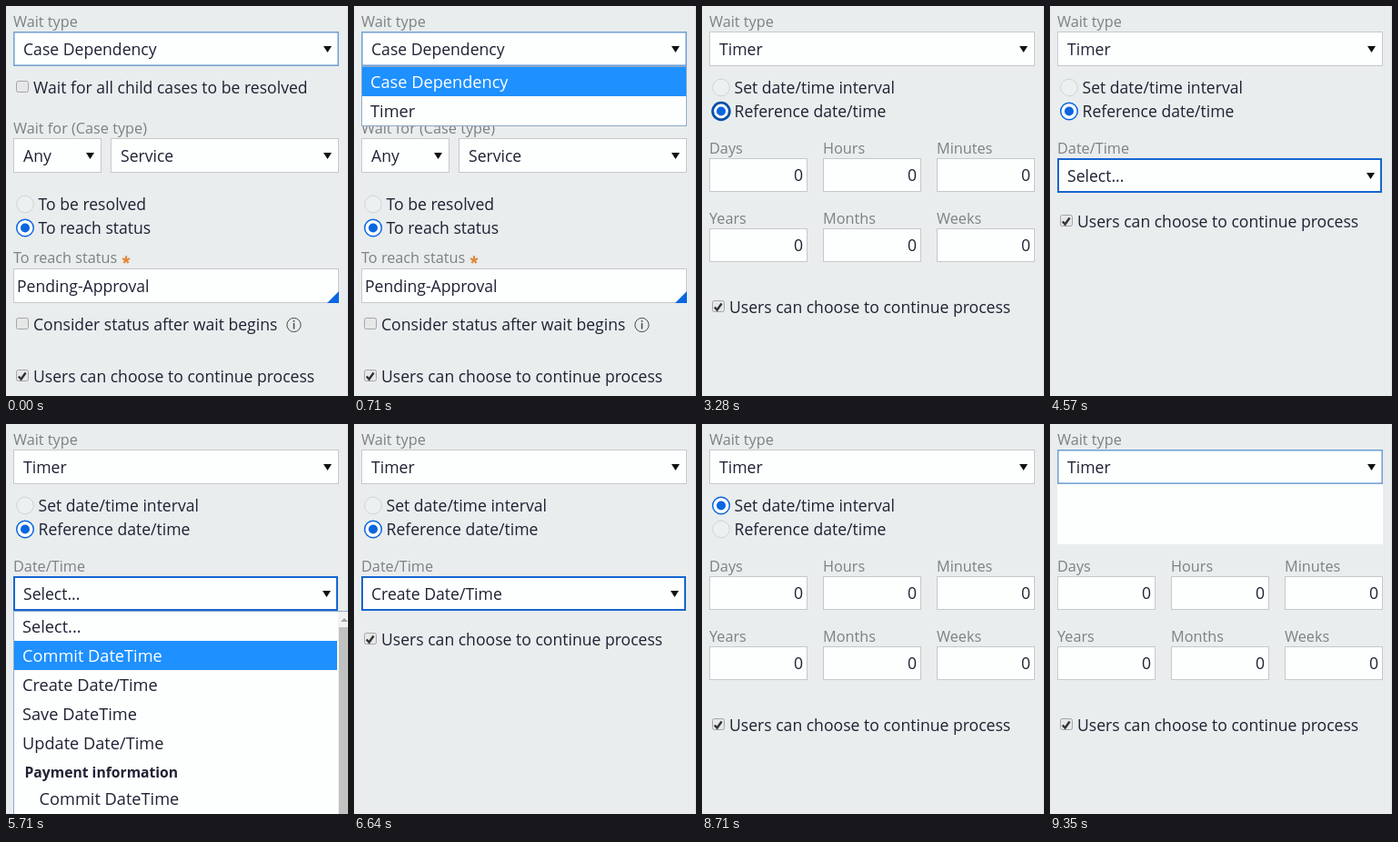
An HTML page for the animation above (9420 ms loop, 376 px wide and 428 px high).

```html
<!DOCTYPE html>
<html lang="en">
<head>
<meta charset="utf-8">
<title>Wait step settings</title>
<style>
html, body { margin: 0; width: 100%; height: 100%; overflow: hidden; background: #e9eded; }
svg { display: block; width: 376px; height: 428px; font: 17.6px "Open Sans", sans-serif; fill: #1e2233; }
.label { font-size: 16.25px; fill: #7d8184; }
.option { font-size: 18.2px; }
.group { font-size: 15.7px; font-weight: 700; }
</style>
</head>
<body>
<svg id="stage" viewBox="0 0 376 428"></svg>
<script>
const BLUE = '#0b66e0', LOOP = 9420;
const stage = document.getElementById('stage');

const rect = (x, y, w, h, fill, extra = '') =>
  `<rect x="${x}" y="${y}" width="${w}" height="${h}" fill="${fill}" ${extra}/>`;
const text = (x, y, str, cls = '', extra = '') =>
  `<text x="${x}" y="${y}" class="${cls}" ${extra}>${str}</text>`;
const label = (x, y, str) => text(x, y, str, 'label');

// Bordered white box; x, y, w, h are its outer edges
function box(x, y, w, h, color = '#c5c9cc', line = 1) {
  return rect(x + line / 2, y + line / 2, w - line, h - line, '#fdfefe',
    `stroke="${color}" stroke-width="${line}"`);
}

function select(x, y, w, str, color, line) {
  const ax = x + w - 17, ay = y + 16;
  return box(x, y, w, 38, color, line) + text(x + 11, y + 26, str) +
    `<path d="M${ax} ${ay}h9l-4.5 7z" fill="#111"/>`;
}

function check(y, str, on) {
  const mark = on ? `<path d="M13.8 ${y - 6.5}l2.8 3 5-7" fill="none" stroke="#30343a" stroke-width="2.4"/>` : '';
  return rect(11.5, y - 13.5, 13, 12, '#e6e7e7', 'stroke="#a3a6a8" rx="2"') + mark + text(30, y, str);
}

function radio(y, str, on, focus) {
  const cy = y - 6.5;
  const ring = on ? `fill="#fff" stroke="${focus ? '#084fa8' : BLUE}" stroke-width="${focus ? 2.8 : 1.5}"`
                  : 'fill="#edf0f0" stroke="#d0d4d6"';
  const dot = on ? `<circle cx="21" cy="${cy}" r="5" fill="${BLUE}"/>` : '';
  return `<circle cx="21" cy="${cy}" r="9.3" ${ring}/>` + dot + text(35.5, y, str);
}

const userChoice = y => check(y, 'Users can choose to continue process', true);

function caseForm() {
  const star = [0, 72, 144, 216, 288].map(a =>
    `<path d="M132 278.500v-4.300" stroke="#e08a3c" stroke-width="2.2" transform="rotate(${a} 132 278.5)"/>`).join('');
  return check(96, 'Wait for all child cases to be resolved') +
    label(8, 140, 'Wait for (Case type)') +
    select(8, 145, 97, 'Any') + select(115, 145, 251, 'Service') +
    radio(224, 'To be resolved') + radio(250, 'To reach status', true) +
    label(8, 282, 'To reach status') + star +
    box(8, 288, 358, 38) + text(12, 314, 'Pending-Approval') +
    `<path d="M366 313v13h-13z" fill="${BLUE}"/>` +
    check(356, 'Consider status after wait begins') +
    '<circle cx="316.500" cy="350" r="7.600" fill="none" stroke="#45494f"/>' +
    rect(315.8, 348, 1.5, 6.5, '#45494f') + rect(315.8, 345, 1.5, 1.7, '#45494f') +
    userChoice(413);
}

const timerRadios = (byRef, focus) =>
  radio(96, 'Set date/time interval', !byRef) + radio(122, 'Reference date/time', byRef, focus);

function intervalForm(s) {
  const units = ['Days', 'Hours', 'Minutes', 'Years', 'Months', 'Weeks'];
  return timerRadios(s.byRef, s.byRef) + units.map((unit, i) => {
    const x = 8 + i % 3 * 125, y = i < 3 ? 167 : 244;
    return label(x, y - 5, unit) + box(x, y, 108, 37) +
      text(x + 103, y + 25, '0', '', 'text-anchor="end"');
  }).join('') + userChoice(337);
}

function dateForm(s) {
  const field = s.dateFocus ? select(8, 167, 357, s.date, '#1766cf', 2) : select(8, 167, 358, s.date);
  return timerRadios(true) + label(8, 162, 'Date/Time') + field + userChoice(243);
}

function options(list, y, w, active) {
  return list.map((str, i) => {
    const top = y + i * 32, on = i === active;
    return (on ? rect(9, top, w, 32, '#1e90ff') : '') +
      text(18, top + 23, str, 'option', on ? 'fill="#fff"' : '');
  }).join('');
}

function typeMenu(active) {
  if (active < 0) return rect(8, 66, 358, 66, '#fdfefe');
  return box(8, 66, 358, 66, '#8fabcc') + options(['Case Dependency', 'Timer'], 67, 356, active);
}

function dateMenu(active) {
  const panel = box(8, 205, 369, 230, '#8fabcc');
  if (active < 0) return panel;
  return panel +
    options(['Select...', 'Commit DateTime', 'Create Date/Time', 'Save DateTime', 'Update Date/Time'], 206, 355, active) +
    text(20.5, 388, 'Payment information', 'group') + text(36.5, 418, 'Commit DateTime', 'option') +
    rect(365, 206, 11, 222, '#f1f1f1') + rect(366, 223, 10, 205, '#c1c1c1') +
    '<path d="M368 217h8l-4-4z" fill="#a3a3a3"/>';
}

const forms = { case: caseForm, interval: intervalForm, date: dateForm };

// Each step overrides the state before it; menu -1 is an empty popup
const steps = [
  [0, { form: 'case', type: 'Case Dependency', typeFocus: true, date: 'Select...' }],
  [280, { typeMenu: -1 }],
  [350, { typeMenu: 0 }],
  [1000, { typeMenu: 1 }],
  [1570, { typeMenu: null, type: 'Timer' }],
  [1780, { form: 'interval' }],
  [3280, { byRef: true, typeFocus: false }],
  [3500, { form: 'date' }],
  [4070, { dateFocus: true }],
  [4640, { dateMenu: -1 }],
  [4710, { dateMenu: 0 }],
  [5710, { dateMenu: 1 }],
  [5780, { dateMenu: 2 }],
  [6210, { dateMenu: null, date: 'Create Date/Time' }],
  [8710, { form: 'interval', byRef: false }],
  [9350, { typeFocus: true, typeMenu: -1 }]
];

function draw(s) {
  stage.innerHTML = rect(0, 0, 376, 428, '#e9eded') + rect(375, 0, 1, 428, '#dce0e2') +
    label(8, 23, 'Wait type') + forms[s.form](s) +
    (s.typeFocus ? select(8, 28, 358, s.type, '#76a3d5', 1.6) : select(8, 28, 358, s.type)) +
    (s.typeMenu != null ? typeMenu(s.typeMenu) : '') +
    (s.dateMenu != null ? dateMenu(s.dateMenu) : '');
}

let shown = -1;
function tick() {
  const t = performance.now() % LOOP;
  const past = steps.filter(step => step[0] <= t);
  if (past.length !== shown) {
    shown = past.length;
    draw(Object.assign({}, ...past.map(step => step[1])));
  }
  requestAnimationFrame(tick);
}
tick();
</script>
</body>
</html>
```
